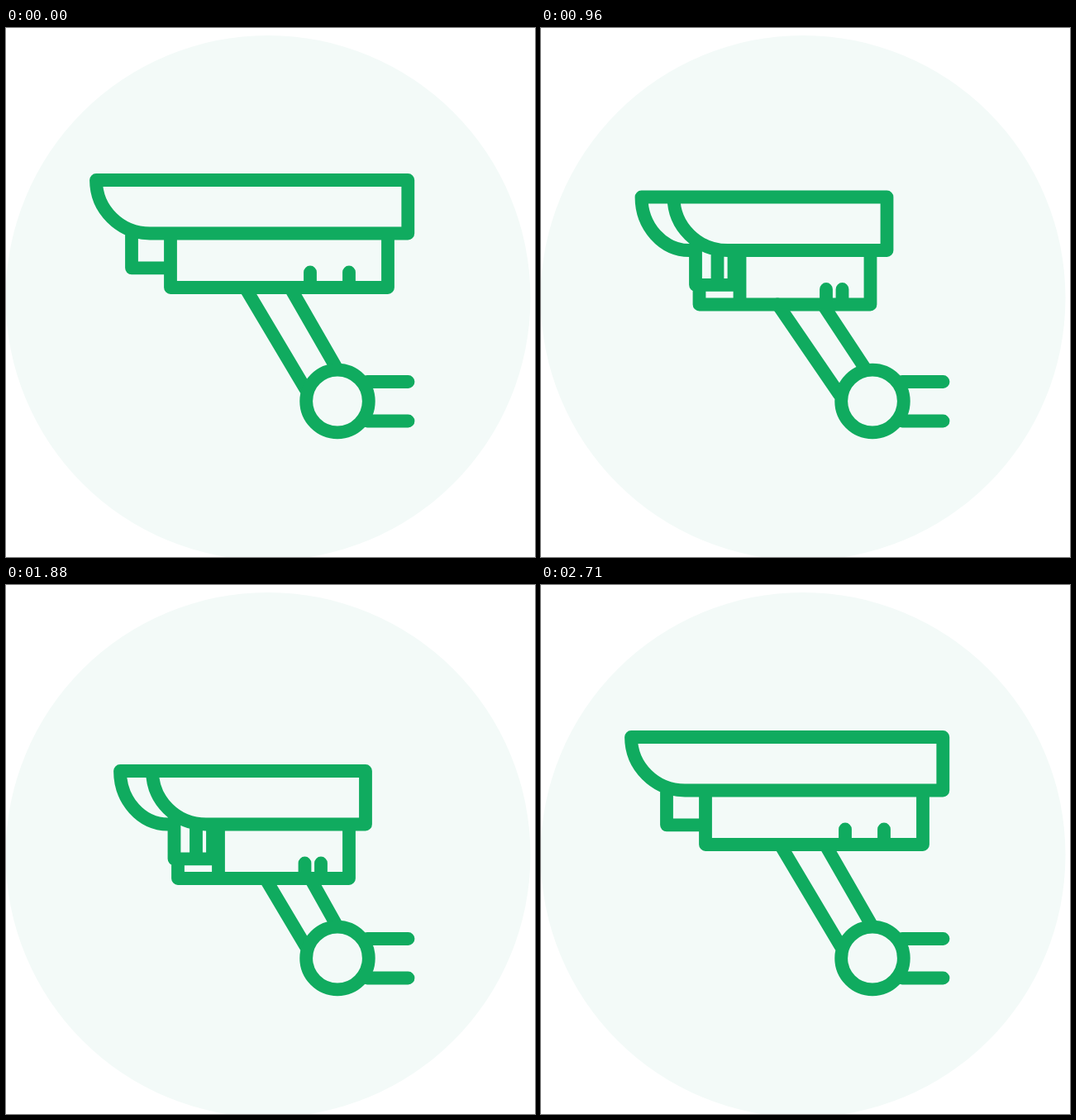
Animation of 640 by 640 pixels, one loop 3000 ms. Source, as an HTML page:

```html
<!DOCTYPE html>
<html lang="en">
<head>
<meta charset="utf-8">
<title>Security camera</title>
<style>
  html, body { margin: 0; width: 100%; height: 100%; overflow: hidden; background: #fff; }
  svg { display: block; width: 100vw; height: 100vh; }
  .line { fill: none; stroke: #10ab5f; stroke-width: 15.8; stroke-linecap: round; stroke-linejoin: round; }
</style>
</head>
<body>
<svg viewBox="0 0 640 640">
  <circle cx="317" cy="326.5" r="317.5" fill="#f3faf8"/>
  <g class="line">
    <path id="arm"/>
    <path d="M437 428H486.5M437 475.5H486.5"/>
    <circle cx="401" cy="451.5" r="37.8"/>
    <path id="head"/>
  </g>
</svg>
<script>
const LOOP = 3000, FPS = 24;

// Poses: turn, x shift, y shift, arm top x, arm swing
const poses = [
  [0, 0, 0, 289.3, 0],
  [1, 0, 0, 289.3, 0],
  [1, -21, 41, 283.7, 1],
  [1, 6, 41, 313.7, 0],
  [0, 0, 0, 289.3, 0]
];
// Start and end step of the move that follows each pose
const moves = [[0, 11], [19, 27], [36, 45], [55, 65]];

const arm = document.getElementById('arm');
const head = document.getElementById('head');
const mix = (a, b, k) => a + (b - a) * k;
const ease = k => k * k * (3 - 2 * k);

function poseAt(step) {
  let pose = poses[0];
  moves.forEach(([start, end], i) => {
    if (step < start) return;
    const k = ease(Math.min(1, (step - start) / (end - start)));
    pose = poses[i].map((v, j) => mix(v, poses[i + 1][j], k));
  });
  return pose;
}

function draw(step) {
  const [turn, dx, dy, armX, swing] = poseAt(step);
  const x = (side, turned) => mix(side, turned, turn) + dx;
  const top = 184 + dy, eave = 248.5 + dy, lensY = 290.3 + dy, base = 314 + dy;

  const front = x(109, 132), back = x(109, 171), right = x(486.3, 429);
  const frontEnd = x(174, 190), backEnd = x(174, 236);
  const curve = (from, to) => `M${from} ${top}A${to - from} ${eave - top} 0 0 0 ${to} ${eave}`;
  const roof = `M${front} ${top}H${right}V${eave}H${backEnd}`
    + curve(front, frontEnd) + curve(back, backEnd);

  const bodyLeft = x(199, 202), bodyEdge = x(199, 251), bodyRight = x(462, 409);
  const body = `M${bodyLeft} ${lensY}V${base}H${bodyRight}V${eave}M${bodyEdge} ${eave}V${base}`;

  const lensLeft = x(152, 197.5), lensEdge = x(152, 224);
  const lensEnd = x(199, 244) - 40 * turn * (1 - turn);
  const lens = `M${lensLeft} ${eave}V${lensY}H${lensEnd}V${eave}M${lensEdge} ${eave}V${lensY}`;

  const ticks = [x(368, 355.5), x(415, 375)]
    .map(tx => `M${tx} ${295.5 + dy}V${base}`).join('');

  head.setAttribute('d', roof + body + lens + ticks);
  arm.setAttribute('d',
    `M${armX} ${base}L${mix(362.5, 359, swing)} ${mix(437, 449, swing)}` +
    `M${armX + 54.5} ${base}L${mix(399, 384, swing)} ${mix(410, 412, swing)}`);
}

const begin = performance.now();
function tick() {
  const t = (performance.now() - begin) % LOOP;
  draw(Math.floor((t + 5) * FPS / 1000));
  requestAnimationFrame(tick);
}
tick();
</script>
</body>
</html>
```
